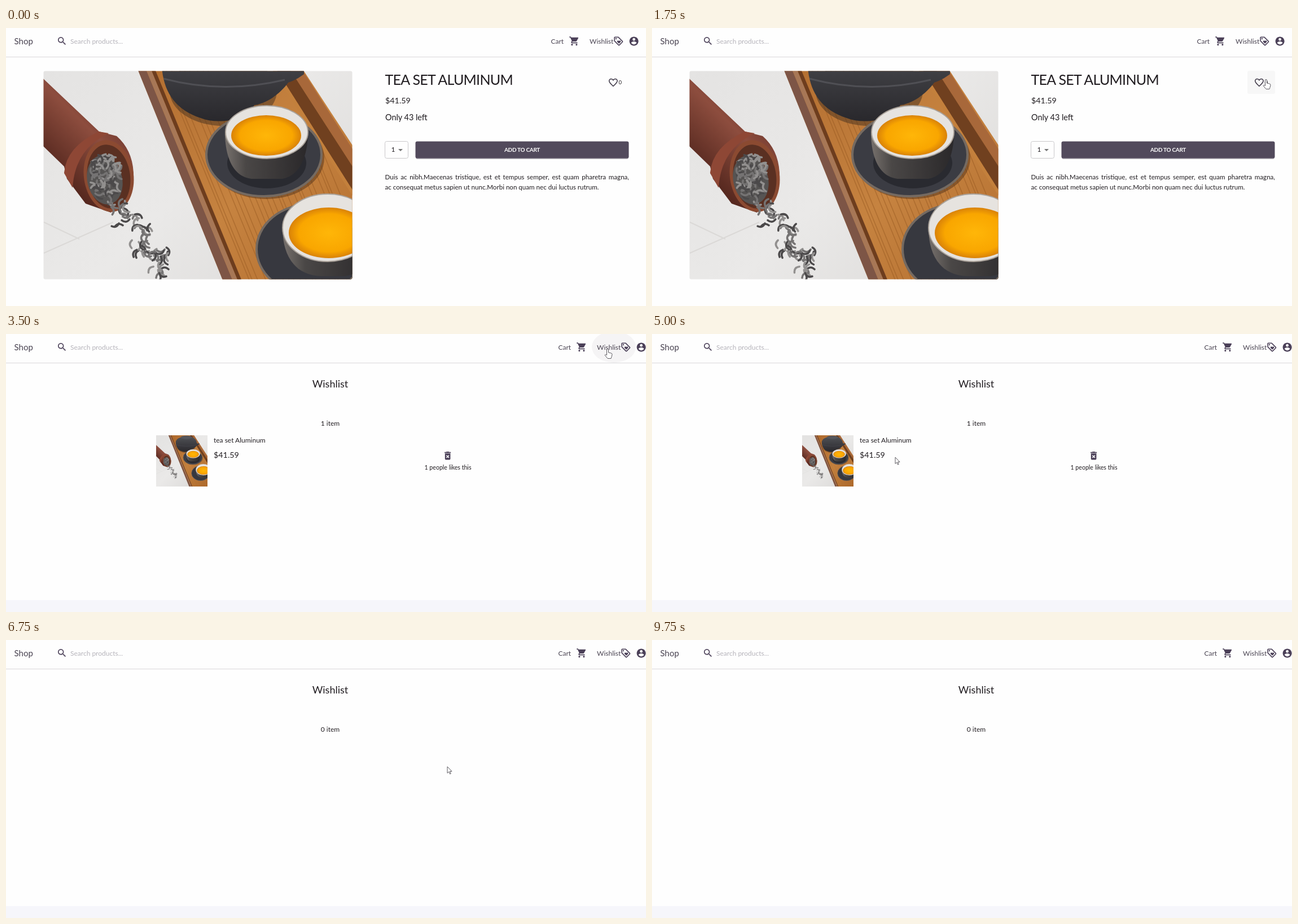
These frames come from a looping animation (1134 by 494 pixels, 10000 ms). An HTML page:

```html
<!DOCTYPE html>
<html lang="en">
<head>
<meta charset="utf-8">
<title>Shop wishlist</title>
<style>
  html, body { margin: 0; width: 100%; height: 100%; overflow: hidden; background: #fefefe; }
  svg.stage { display: block; width: 1134px; height: 494px; }
  text, p { font-family: Lato, "Open Sans", sans-serif; }
  text { fill: #201c20; font-size: 12px; }
  .nav text { fill: #4a4452; }
  .nav .hint { fill: #b5b3ba; }
  .icon { fill: #4b4058; }
  .mid { text-anchor: middle; }
  p { margin: 0; font-size: 11.6px; line-height: 18px; color: #201c20; white-space: nowrap; }
  .full { text-align-last: justify; }
</style>
</head>
<body>
<svg class="stage" viewBox="0 0 1134 494">
  <defs>
    <linearGradient id="table" x2="1" y2="1">
      <stop stop-color="#e3e2e1"/><stop offset=".5" stop-color="#eae9e8"/><stop offset="1" stop-color="#d8d6d4"/>
    </linearGradient>
    <linearGradient id="wood" x2="1" y2="1">
      <stop stop-color="#ad682c"/><stop offset=".5" stop-color="#c68340"/><stop offset="1" stop-color="#aa6528"/>
    </linearGradient>
    <linearGradient id="bamboo" x1=".7" y1=".2" x2=".3" y2=".8">
      <stop stop-color="#6b352b"/><stop offset=".35" stop-color="#8d4d3e"/><stop offset="1" stop-color="#56281f"/>
    </linearGradient>
    <linearGradient id="clay" x2="0" y2="1">
      <stop stop-color="#515257"/><stop offset="1" stop-color="#29282c"/>
    </linearGradient>
    <linearGradient id="cup">
      <stop stop-color="#77716d"/><stop offset=".25" stop-color="#4a4746"/><stop offset="1" stop-color="#2a282a"/>
    </linearGradient>
    <radialGradient id="tea">
      <stop stop-color="#ffb608"/><stop offset=".75" stop-color="#f9a600"/><stop offset="1" stop-color="#d98208"/>
    </radialGradient>
    <clipPath id="frame"><rect x="66.5" y="76.5" width="547" height="370" rx="3"/></clipPath>
    <clipPath id="square"><rect x="67" y="-12" width="547" height="547"/></clipPath>

    <g id="photo">
      <rect x="66" y="-12" width="548" height="547" fill="url(#table)"/>
      <path d="M67 400L190 345M67 345L130 375" stroke="#dbd9d7" stroke-width="2"/>
      <path d="M199 -12H470L700 340V535H419Z" fill="url(#wood)"/>
      <g id="grain" stroke="#93561f" stroke-width="1.5" opacity=".45"/>
      <path d="M199 -12H213L437 535H419Z" fill="#7d5546"/>
      <path d="M213 -12H222L446 535H437Z" fill="#a77756"/>
      <path d="M222 -12H229L453 535H446Z" fill="#6d3d1e"/>
      <path d="M470 -12L614 215V246L448 -12Z" fill="#a8683a"/>
      <path d="M448 -12L614 246V288L425 -12Z" fill="#70401f"/>
      <path d="M425 -12L614 288V298L417 -12Z" fill="#c3803c"/>

      <ellipse cx="385" cy="112" rx="95" ry="62" fill="#46301f" opacity=".5"/>
      <path d="M276 70C270 30 320 0 395 0S498 35 500 72Q518 80 528 72V82Q515 92 500 97C485 118 460 135 440 137C425 165 375 172 345 160C300 145 280 115 276 70Z" fill="url(#clay)"/>
      <ellipse cx="390" cy="10" rx="60" ry="18" fill="#55565c"/>
      <path d="M279 90Q385 118 494 92" fill="none" stroke="#66676d" stroke-width="3" opacity=".5"/>

      <ellipse cx="461" cy="231" rx="103" ry="73" fill="#53331b" opacity=".5"/>
      <ellipse cx="457" cy="225" rx="102" ry="74" fill="#3b3c43" stroke="#756a61" stroke-width="4"/>
      <ellipse cx="462" cy="240" rx="70" ry="45" fill="#292a30"/>
      <path d="M388 185C388 225 400 264 435 268H490C522 262 535 225 535 185Z" fill="url(#cup)"/>
      <ellipse cx="462" cy="185" rx="73" ry="47" fill="#e6e3df" stroke="#aaa29a" stroke-width="2"/>
      <ellipse cx="461" cy="191" rx="62" ry="36" fill="url(#tea)"/>

      <ellipse cx="540" cy="393" rx="96" ry="80" fill="#37383f" stroke="#756a61" stroke-width="4"/>
      <path d="M490 355C490 405 512 440 560 441H600C640 436 650 400 650 355Z" fill="url(#cup)"/>
      <ellipse cx="570" cy="355" rx="80" ry="60" fill="#e6e3df" stroke="#aaa29a" stroke-width="2"/>
      <ellipse cx="572" cy="364" rx="71" ry="45" fill="url(#tea)"/>

      <path d="M66 90L165 184 196 192Q228 220 226 270L186 328L141 312L108 268 103 246 66 210Z" fill="url(#bamboo)"/>
      <path d="M103 258Q106 212 164 184L182 187Q122 215 118 284Z" fill="#8e4735"/>
      <ellipse cx="182" cy="263" rx="44" ry="64" transform="rotate(-8 182 263)" fill="#8b4a31"/>
      <ellipse cx="182" cy="264" rx="38" ry="57" transform="rotate(-8 182 264)" fill="#5a3022"/>
      <ellipse cx="175" cy="270" rx="31" ry="44" transform="rotate(-12 175 270)" fill="#565453"/>
      <g id="leaves" fill="none" stroke-width="3.5" stroke-linecap="round"/>
    </g>
    <path id="heart" d="M12 20 10.5 18.7C5.7 14.4 3 11.9 3 8.5 3 6 5 4 7.5 4c1.8 0 3.6 1 4.5 2.7C12.9 5 14.7 4 16.5 4 19 4 21 6 21 8.5c0 3.4-2.7 5.9-7.5 10.2z"/>
  </defs>

  <rect width="1134" height="494" fill="#fefefe"/>
  <g class="nav">
    <path d="M0 51.5H1134" stroke="#d9d8da"/>
    <text x="14.5" y="28.5" style="font-size:15px">Shop</text>
    <path class="icon" transform="translate(89.6 13.6) scale(.8)" d="M15.5 14h-.79l-.28-.27C15.41 12.59 16 11.11 16 9.5 16 5.91 13.09 3 9.5 3S3 5.91 3 9.5 5.91 16 9.5 16c1.61 0 3.09-.59 4.23-1.57l.27.28v.79l5 4.99L20.49 19l-4.99-5zm-6 0C7.01 14 5 11.99 5 9.5S7.01 5 9.5 5 14 7.01 14 9.5 11.99 14 9.5 14z"/>
    <text class="hint" x="114" y="28">Search products...</text>
    <g id="menu">
      <ellipse id="menuHover" cx="1064" cy="23" rx="39" ry="28" fill="#f5f4f5"/>
      <text x="965.5" y="28">Cart</text>
      <text x="1034" y="28">Wishlist</text>
      <path class="icon" transform="translate(997.3 13.6) scale(.8)" d="M7 18c-1.1 0-1.99.9-1.99 2S5.9 22 7 22s2-.9 2-2-.9-2-2-2zM1 2v2h2l3.6 7.59-1.35 2.45c-.16.28-.25.61-.25.96 0 1.1.9 2 2 2h12v-2H7.42c-.14 0-.25-.11-.25-.25l.03-.12.9-1.63h7.45c.75 0 1.41-.41 1.75-1.03l3.58-6.49A1 1 0 0 0 20 4H5.21l-.94-2H1zm16 16c-1.1 0-1.99.9-1.99 2s.89 2 1.99 2 2-.9 2-2-.9-2-2-2z"/>
      <path class="icon" transform="translate(1075.7 13.8) scale(.8)" d="M21.41 11.58l-9-9C12.05 2.22 11.55 2 11 2H4c-1.1 0-2 .9-2 2v7c0 .55.22 1.05.59 1.42l9 9c.36.36.86.58 1.41.58s1.05-.22 1.41-.59l7-7c.37-.36.59-.86.59-1.41s-.23-1.06-.59-1.42zM13 20.01L4 11V4h7l9 9zM5 6.5a1.5 1.5 0 1 0 3 0a1.5 1.5 0 1 0-3 0zM8.9 12.55c0 .57.23 1.07.6 1.45l3.5 3.5 3.5-3.5c.37-.37.6-.89.6-1.45 0-1.13-.92-2.05-2.05-2.05-.57 0-1.08.23-1.45.6l-.6.6-.6-.59c-.37-.38-.89-.61-1.45-.61-1.13 0-2.05.92-2.05 2.05z" fill-rule="evenodd"/>
      <path class="icon" transform="translate(1103 13.8) scale(.8)" d="M12 2C6.48 2 2 6.48 2 12s4.48 10 10 10 10-4.48 10-10S17.52 2 12 2zm0 3c1.66 0 3 1.34 3 3s-1.34 3-3 3-3-1.34-3-3 1.34-3 3-3zm0 14.2c-2.5 0-4.71-1.28-6-3.22.03-1.99 4-3.08 6-3.08 1.99 0 5.97 1.09 6 3.08-1.29 1.94-3.5 3.22-6 3.22z"/>
    </g>
  </g>

  <g id="product">
    <g clip-path="url(#frame)"><use href="#photo"/></g>
    <text x="671.5" y="101" style="font-size:25px;letter-spacing:-.7px">TEA SET ALUMINUM</text>
    <text x="672" y="134" style="font-size:14.3px">$41.59</text>
    <text x="672" y="164" style="font-size:14.4px">Only 43 left</text>
    <rect id="likeHover" x="1055" y="76" width="49" height="41" rx="3" fill="#f7f7f7"/>
    <use id="like" href="#heart" transform="translate(1066.3 87.3) scale(.8)" stroke="#3f3948" stroke-width="2"/>
    <text id="likes" x="1085.5" y="100" style="font-size:9.5px"></text>
    <rect x="671.5" y="201.5" width="41" height="30" rx="3" fill="none" stroke="#c9c8ca"/>
    <text x="682.5" y="220">1</text>
    <path d="M695 215h8l-4 4z" fill="#757575"/>
    <rect x="726" y="203" width="377" height="30" rx="3" fill="#b9b6bd"/>
    <rect x="725.5" y="201.5" width="378" height="30" rx="3" fill="#524a5c"/>
    <text class="mid" x="914.5" y="219.8" style="font-size:10px;font-weight:700;fill:#fff;letter-spacing:-.3px">ADD TO CART</text>
    <foreignObject x="671.5" y="256" width="432.5" height="40">
      <p class="full">Duis ac nibh.Maecenas tristique, est et tempus semper, est quam pharetra magna,</p>
      <p>ac consequat metus sapien ut nunc.Morbi non quam nec dui luctus rutrum.</p>
    </foreignObject>
  </g>

  <g id="wishlist">
    <rect y="473" width="1134" height="21" fill="#f6f6fb"/>
    <text class="mid" x="574.5" y="95" style="font-size:18px">Wishlist</text>
    <text id="count" class="mid" x="574.5" y="162.5"></text>
    <g id="item">
      <g transform="translate(266 180) scale(.1664) translate(-67 12)"><g clip-path="url(#square)"><use href="#photo"/></g></g>
      <text x="368" y="193">tea set Aluminum</text>
      <text x="368" y="220" style="font-size:14.3px">$41.59</text>
      <path class="icon" transform="translate(773 206.6) scale(.8)" d="M6 19c0 1.1.9 2 2 2h8c1.1 0 2-.9 2-2V7H6v12zm2.46-7.12l1.41-1.41L12 12.59l2.12-2.12 1.41 1.41L13.41 14l2.12 2.12-1.41 1.41L12 15.41l-2.12 2.12-1.41-1.41L10.59 14l-2.13-2.12zM15.5 4l-1-1h-5l-1 1H5v2h14V4z"/>
      <text class="mid" x="783" y="241" style="font-size:10.6px">1 people likes this</text>
    </g>
  </g>

  <path id="cursor" fill="#fff" stroke="#5c5a60"/>
</svg>

<script>
const $ = id => document.getElementById(id);
const show = (id, on) => $(id).style.display = on ? '' : 'none';

let seed = 7;
const rnd = () => (seed = seed * 16807 % 2147483647) / 2147483647;

// Wood grain runs parallel to the tray's left edge.
let grain = '';
for (let i = 0; i < 24; i++) {
  const x = 225 + i * 14 + rnd() * 8;
  grain += `M${x} ${-12 + i * 9}L${x + 224 - i * 3.7} 535`;
}
$('grain').innerHTML = `<path d="${grain}"/>`;

const trail = [[200, 322], [222, 345], [244, 366], [236, 392], [256, 400], [284, 405], [268, 434], [190, 348]];
const leafTones = ['#4b494a', '#757373', '#92908f'];
function leaf(x, y) {
  const a = rnd() * 6.3, dx = 7 * Math.cos(a), dy = 7 * Math.sin(a);
  return `<path stroke="${leafTones[rnd() * 3 | 0]}" d="M${x - dx} ${y - dy}Q${x + dy} ${y - dx} ${x + dx} ${y + dy}"/>`;
}
let leaves = '';
for (let i = 0; i < 75; i++) {
  const a = rnd() * 6.3, r = Math.sqrt(rnd());
  leaves += leaf(176 + 29 * r * Math.cos(a), 271 + 44 * r * Math.sin(a));
}
for (const [x, y] of trail)
  for (let i = 0; i < (x < 195 ? 2 : 9); i++)
    leaves += leaf(x + rnd() * 28 - 14, y + rnd() * 24 - 12);
$('leaves').innerHTML = leaves;

const ARROW = 'M0 0V11.5L2.7 9 4.5 13.2 6.2 12.4 4.5 8.4H8Z';
const HAND = 'M-1.5 9V1a1.5 1.5 0 0 1 3 0V6l4 .8q2.5.4 2.5 2.7l-1 4-1 3H0l-5-6q1-2 3.5 0z';
const STEP = 250, LIKED = 2250, OPENED = 3500, REMOVED = 6750;

// Cursor tip: time, x, y
const path = [
  [1000, 980, 300], [1250, 1070, 150], [1750, 1088, 92], [2500, 1088, 92],
  [3250, 1066, 27], [3750, 1066, 27], [4250, 960, 160], [4500, 760, 275],
  [5000, 431, 219], [5250, 436, 221], [6000, 782, 216], [6500, 782, 217],
  [6750, 782, 225], [7250, 800, 265]
];
function tipAt(t) {
  const i = path.findIndex(p => p[0] > t);
  if (i < 0) return path[path.length - 1].slice(1);
  if (i === 0) return path[0].slice(1);
  const [t0, x0, y0] = path[i - 1], [t1, x1, y1] = path[i], k = (t - t0) / (t1 - t0);
  return [x0 + (x1 - x0) * k, y0 + (y1 - y0) * k];
}

function draw(t) {
  t = Math.floor(t / STEP) * STEP;
  if (t === 1500 || t === 4000) t -= STEP; // brief holds
  const listPage = t >= OPENED, liked = t >= LIKED, kept = t < REMOVED;
  const visible = t >= 1000 && t < 7500;
  const [x, y] = tipAt(t);
  const over = (l, top, r, b) => visible && x > l && x < r && y > top && y < b;
  const onLike = !listPage && over(1055, 76, 1104, 117);
  const onMenu = over(1025, 0, 1116, 48);
  const onDelete = listPage && kept && over(772, 205, 794, 226);

  show('product', !listPage);
  show('wishlist', listPage);
  show('item', kept);
  show('likeHover', onLike);
  show('menuHover', onMenu);
  show('cursor', visible);
  $('menu').setAttribute('transform', `translate(${listPage ? 13 : 0} 0)`);
  $('like').setAttribute('fill', liked ? '#4b4058' : 'none');
  $('likes').textContent = liked ? 1 : 0;
  $('count').textContent = (kept ? 1 : 0) + ' item';
  $('cursor').setAttribute('d', onLike || onMenu || onDelete ? HAND : ARROW);
  $('cursor').setAttribute('transform', `translate(${x} ${y})`);
}

const start = performance.now();
function tick() {
  draw((performance.now() - start) % 10000);
  requestAnimationFrame(tick);
}
tick();
</script>
</body>
</html>
```
